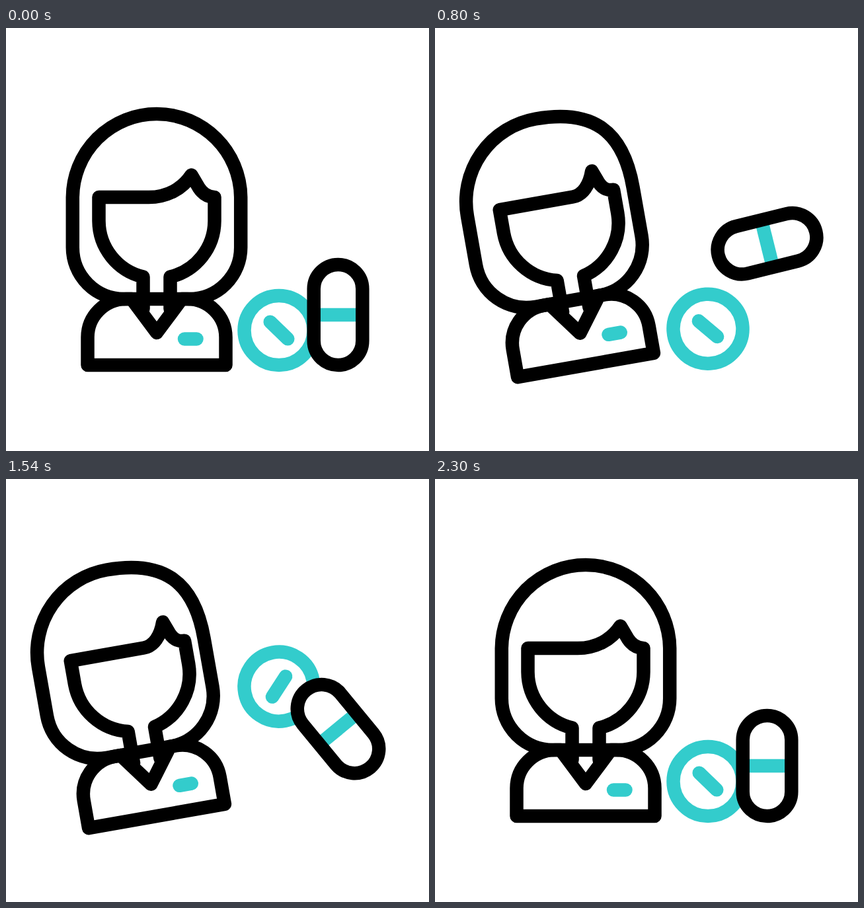
Write an HTML page that moves like this. It is 640 px wide and 640 px high and loops after 2.4 s.

```html
<!DOCTYPE html>
<html lang="en">
<head>
<meta charset="utf-8">
<title>Pharmacist</title>
<style>
  html, body { margin: 0; width: 100%; height: 100%; overflow: hidden; background: #fff; }
  svg { display: block; width: 100vw; height: 100vh; }
  g { fill: none; stroke: #000; stroke-width: 20.5; stroke-linecap: round; stroke-linejoin: round; }
  .teal { stroke: #33cccc; }
</style>
</head>
<body>
<svg viewBox="0 0 640 640">
  <g id="tablet" class="teal">
    <circle r="52.5"/>
    <path d="M-13.3 -12.8L13.3 12.8"/>
  </g>
  <g id="capsule">
    <rect x="-36.8" y="-76" width="73.6" height="152" rx="36.8" fill="#fff" stroke="none"/>
    <path class="teal" d="M-36 0H36" stroke-linecap="butt"/>
    <rect x="-36.8" y="-76" width="73.6" height="152" rx="36.8"/>
  </g>
  <g id="woman">
    <path id="hair"/>
    <path id="face"/>
    <path d="M190 410L228 461L266 410H274.5A58 58 0 0 1 332.5 468V510H123.5V468A58 58 0 0 1 181.5 410Z"/>
    <path class="teal" d="M270 470.5H288.5"/>
  </g>
</svg>
<script>
const LOOP = 2400;
const el = id => document.getElementById(id);
const [tablet, capsule, woman, hair, face] =
  ['tablet', 'capsule', 'woman', 'hair', 'face'].map(el);

// Each row: time in ms, then values
const LEAN = [[200, 0], [600, 1], [1800, 1], [2200, 0]];
const CAPSULE = [[200, 434, 0], [1000, 306.5, 90], [2000, 434, 180]];
const TABLET = [[200, 457.5, 0], [600, 483.5, -18], [1400, 304, 72], [2300, 457.5, 180]];

const mix = (a, b, k) => a + (b - a) * k;

function at(keys, t) {
  if (t <= keys[0][0]) return keys[0].slice(1);
  const i = keys.findIndex(key => t < key[0]);
  if (i < 0) return keys[keys.length - 1].slice(1);
  const a = keys[i - 1], b = keys[i];
  const s = (t - a[0]) / (b[0] - a[0]);
  const k = s * s * (3 - 2 * s);
  return a.slice(1).map((v, j) => mix(v, b[j + 1], k));
}

function place(node, x, [y, turn]) {
  node.setAttribute('transform', `translate(${x} ${y}) rotate(${turn})`);
}

function hairPath(k) {
  const mid = 228 - 10 * k, l = mid - 127.2, r = mid + 127.2;
  return `M${l} 257.2A127.2 127.2 0 0 1 ${mid} 130` +
    `C${mid + 70.3 + 18 * k} 130 ${r} ${187 - 16 * k} ${r} 257.2` +
    `V332A78 78 0 0 1 ${r - 78} 410H${l + 78}A78 78 0 0 1 ${l} 332Z`;
}

function facePath(k) {
  const m = (a, b) => mix(a, b, k);
  return `M207.5 425V376.5A87.5 87.5 0 0 1 140.5 292V256H${m(216, 253)}` +
    `C${m(244, 268)} 256 ${m(267, 281)} 243 ${m(280.5, 288)} 222.5` +
    `L${m(292, 295)} ${m(242, 241)}` +
    `C${m(298, 300)} ${m(251, 252)} 306 256 315.5 256` +
    `V292A87.5 87.5 0 0 1 248.5 376.5V425`;
}

function draw(t) {
  const [k] = at(LEAN, t);
  woman.setAttribute('transform', `rotate(${-10 * k} 228 510)`);
  hair.setAttribute('d', hairPath(k));
  face.setAttribute('d', facePath(k));
  place(tablet, 413, at(TABLET, t));
  place(capsule, 502.5, at(CAPSULE, t));
}

const start = performance.now();
function tick() {
  draw((performance.now() - start) % LOOP);
  requestAnimationFrame(tick);
}
tick();
</script>
</body>
</html>
```
